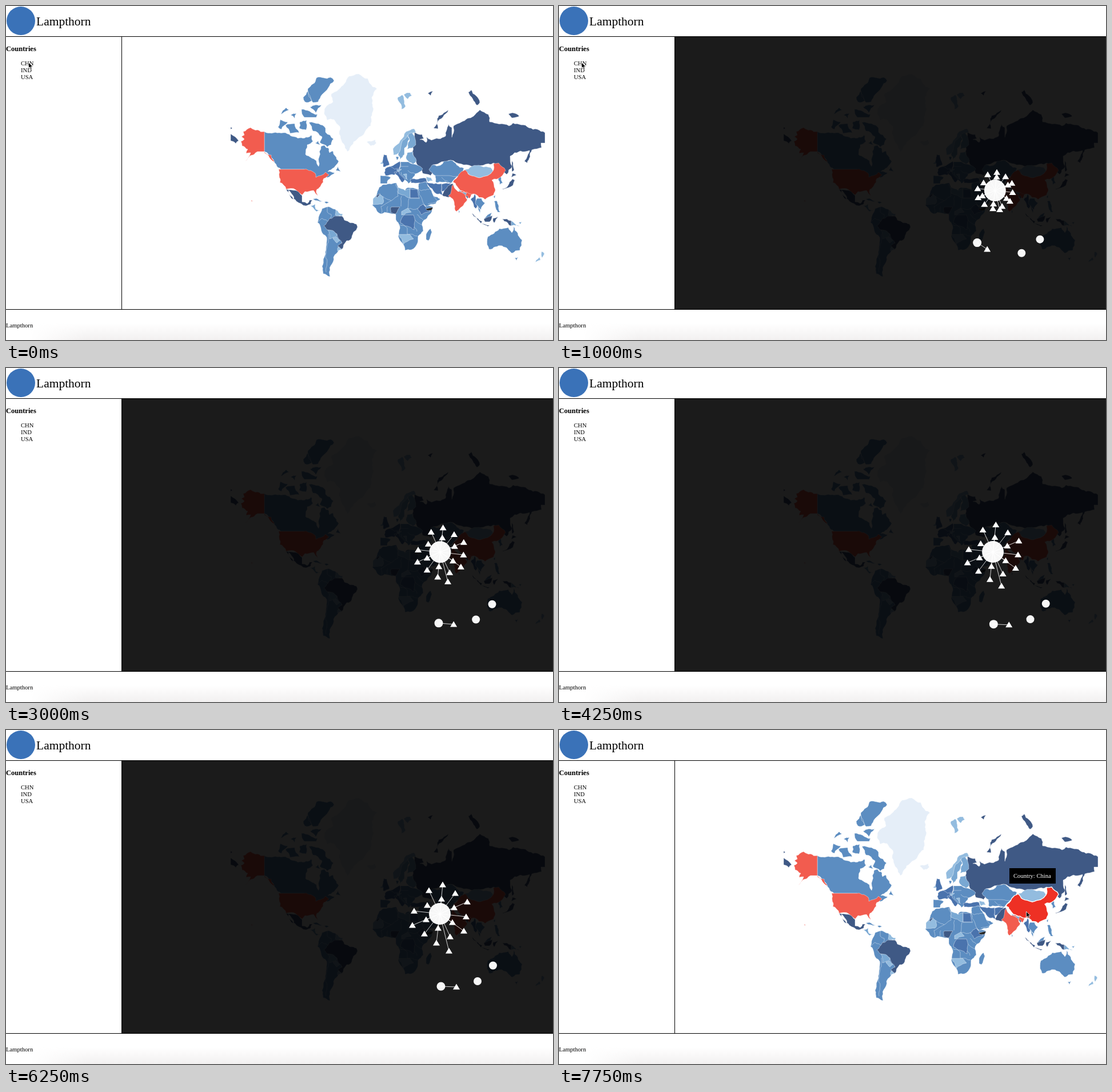
Recreate the animation shown at these times as an HTML page. Size 957 px wide and 585 px high, loop 8000 ms.

```html
<!DOCTYPE html>
<html lang="en">
<head>
<meta charset="utf-8">
<title>Lampthorn</title>
<style>
  html, body { margin: 0; width: 100%; height: 100%; overflow: hidden; background: #fff; }
  svg { display: block; width: 957px; height: 585px; }
  text { font: 10.64px "Liberation Serif", serif; }
  .title { font-size: 21.5px; }
  .heading { font-size: 12.5px; font-weight: bold; }
  #map path { stroke: #fff; stroke-width: .4; stroke-linejoin: round; }
  .blue { fill: #5c8dc1; }
  .deep { fill: #4a73ad; }
  .navy { fill: #3f5985; }
  .mid { fill: #79a8d3; }
  .pale { fill: #93bcdf; }
  .ice { fill: #e5eef8; }
  .red { fill: #f25c4f; }
  .border { fill: none; }
  #map .hover { fill: #ee3024; stroke-width: 1.3; }
</style>
</head>
<body>
<svg viewBox="0 0 957 585">
  <defs>
    <linearGradient id="down" x2="0" y2="1"><stop stop-color="#fff"/><stop offset="1" stop-color="#f2f0f0"/></linearGradient>
    <linearGradient id="across"><stop offset=".3" stop-color="#fff"/><stop offset="1" stop-color="#fff" stop-opacity="0"/></linearGradient>
  </defs>
  <rect y="556" width="957" height="29" fill="url(#down)"/>
  <rect y="556" width="140" height="29" fill="url(#across)"/>

  <circle cx="26" cy="26" r="25" fill="#3a72b8"/>
  <text class="title" x="53" y="34">Lampthorn</text>
  <text class="heading" y="78.5">Countries</text>
  <text x="26" y="104">CHN</text>
  <text x="26" y="116">IND</text>
  <text x="26" y="128">USA</text>
  <text y="563">Lampthorn</text>

  <g id="map">
    <!-- North America -->
    <path class="ice" d="M597 255L585 228 584 211 574 199 562 200 557 181 572 168 569 154 592 136 600 123 617 119 633 127 636 135 649 145 640 160 643 180 638 210 622 228 608 238Z"/>
    <path class="ice" d="M631 238L646 234 648 240 638 245Z"/>
    <path class="blue" d="M452 220L478 222 505 229 528 230 534 226 537 237 527 243 524 260 543 271 547 281 548 264 551 246 557 244 565 250 566 257 572 254 582 272 574 283 563 290 575 292 566 299 540 300 522 286 481 286 466 267 452 255Z"/>
    <path class="blue" d="M530 159L528 145 543 126 568 125 574 131 553 155 546 168 537 169ZM520 160L528 149 535 166 523 168ZM532 177L552 173 542 187ZM489 209L505 206 513 222 497 223ZM476 212L480 199 493 203 482 216ZM481 190L490 178 495 182ZM498 191L508 188 505 197ZM517 181L545 190 543 195 522 195Z"/>
    <path class="blue" d="M530 204L547 206 559 214 559 221 573 233 569 243 562 247 549 239 553 229 537 219ZM514 203L526 200 525 217 513 214ZM541 240L546 236 550 243ZM577 288L581 281 586 290Z"/>
    <path class="red" d="M452 220L428 213 415 220 417 226 412 229 417 233 411 237 413 245 423 251 420 258 428 257 417 272 434 260 440 255 452 255 464 261 470 273 452 257Z"/>
    <path class="red" d="M477 286L522 286 533 288 541 293 542 300 559 291 565 296 556 302 551 314 544 321 545 333 538 323 523 325 518 331 507 322 490 321 479 309Z"/>
    <path class="red" d="M429 340L431 341 430 343Z"/>
    <path class="navy" d="M490 321L507 323 518 332 518 343 527 346 531 340 536 340 533 347 525 350 508 342 494 323 503 339 497 333Z"/>
    <path class="mid" d="M529 349L541 347 542 356 551 358 543 360Z"/>
    <path class="blue" d="M537 338L543 337 554 342ZM557 343L565 344 560 346Z"/>

    <!-- South America -->
    <path class="blue" d="M551 361L553 355 561 352 576 356 590 375 585 425 573 440 566 470 567 474 555 469 553 456 561 405 545 379Z"/>
    <path class="border" d="M562 352L562 361 569 365 566 378 553 372 545 378M564 399L564 414 559 437 560 466"/>
    <path class="navy" d="M566 372L575 368 588 368 592 375 613 382 615 387 608 396 603 409 596 411 587 427 580 421 588 415 579 399 556 385Z"/>
    <path class="pale" d="M577 357L589 364 588 368 576 366ZM572 406L578 404 584 411 579 415ZM582 421L588 426 580 429Z"/>
    <path class="mid" d="M563 392L571 393 579 402 566 408Z"/>

    <!-- Africa -->
    <path class="blue" d="M659 313L683 310 686 318 698 323 703 318 721 321 733 351 747 352 744 362 728 380 730 394 721 403 720 415 709 427 698 428 687 400 689 386 682 374 682 365 656 364 641 349 643 337Z"/>
    <path class="border" d="M653 329L674 341 686 333 682 311M674 341L656 351 657 363M692 333L691 351M705 337L703 355 721 354M706 337L724 337M666 362L668 351M688 383L702 389 702 400 720 403M714 373L729 384M714 386L719 395M719 365L730 375"/>
    <path class="blue" d="M735 409L735 400 743 390 745 396 739 411Z"/>
    <path class="mid" d="M685 317L698 323 707 320 707 336 686 328Z"/>
    <path class="deep" d="M707 320L720 321 723 336 707 336ZM720 355L729 347 742 360 727 366ZM690 380L697 366 713 366 714 392Z"/>
    <path class="pale" d="M642 338L653 330 660 335 658 347 642 348ZM692 360L703 354 709 361 692 366ZM687 400L706 400 713 408 695 418Z"/>
    <path class="navy" d="M674 352L689 352 683 363 673 362ZM648 333L655 329 649 336Z"/>
    <path fill="#222" d="M734 355L747 353 744 358 737 358Z"/>

    <!-- Russia -->
    <path class="navy" d="M714 220L728 225 731 232 724 234 735 239 736 229 744 235 769 228 774 207 780 213 780 230 783 210 797 203 818 193 829 182 844 190 846 203 880 210 887 205 943 222 943 240 936 240 937 248 920 252 912 275 907 272 916 253 900 254 882 263 886 281 876 295 854 275 815 281 778 270 747 278 743 297 729 293 712 260Z"/>
    <path class="navy" d="M885 271L889 287 885 290ZM748 214L757 192 774 182 754 206 756 215ZM809 151L814 147 829 169 824 174ZM738 153L747 149 743 157ZM879 189L886 187 898 193 885 196ZM393 224L407 236 402 241 393 236ZM393 212L396 214 393 216Z"/>

    <!-- Europe -->
    <path class="pale" d="M685 161L694 156 699 176 692 181ZM696 155L707 152 710 157 703 163ZM678 261L677 250 700 220 714 215 717 221 702 228 688 257ZM654 276L660 269 659 277Z"/>
    <path class="mid" d="M686 261L694 235 703 226 706 233 697 249 697 260 690 269ZM703 226L711 222 717 243 702 251 706 236ZM702 257L712 255 718 271 712 277 701 269Z"/>
    <path class="blue" d="M655 297L673 300 667 311 655 311ZM682 264L687 264 684 270ZM690 273L704 273 718 278 729 285 716 294 712 300 704 311 687 291Z"/>
    <path class="deep" d="M661 260L666 261 671 278 660 282ZM663 286L672 281 689 272 688 287 679 296 664 297ZM679 291L687 289 698 304 694 309ZM707 304L735 302 737 309 709 310Z"/>
    <path class="pale" d="M683 287L692 286 687 290ZM695 295L701 294 701 303ZM735 299L744 301 747 306 738 308Z"/>
    <path class="border" d="M672 281L680 286 691 281 690 273M691 281L704 281M703 288L716 294M691 291L703 304"/>

    <!-- Asia -->
    <path class="blue" d="M722 311L737 309 748 333 760 338 752 346 735 351 721 322Z"/>
    <path class="border" d="M721 322L742 320M748 334L755 342 738 347"/>
    <path class="blue" d="M740 286L747 278 760 279 766 272 778 270 801 284 797 293 779 310 752 309 751 297Z"/>
    <path class="border" d="M751 297L775 297 790 298M762 300L775 309"/>
    <path class="deep" d="M736 308L762 311 764 331 753 329 742 318ZM762 312L779 310 771 320 762 325ZM813 339L820 329 825 350 822 355Z"/>
    <path class="navy" d="M763 331L771 319 781 311 784 317 775 335ZM868 320L878 315 886 303 890 305 887 314 870 321ZM884 300L886 293 893 296Z"/>
    <path class="blue" d="M821 346L824 337 832 337 838 345 831 357 824 350 830 364ZM861 303L866 299 869 310 864 313ZM853 334L856 331 855 337ZM854 342L858 341 865 361 860 361ZM791 357L794 360 792 363ZM837 372L850 362 848 371Z"/>
    <path class="navy" d="M815 363L833 377 831 381ZM831 381L846 384 843 386ZM836 373L851 367 846 378 838 378ZM852 372L861 369 857 374 854 380ZM868 373L884 376 884 385Z"/>
    <path class="mid" d="M884 376L899 386 884 385ZM897 379L902 378 900 382Z"/>
    <path class="pale" d="M802 287L815 281 848 283 852 289 843 297 828 301 811 296Z"/>
    <path class="red" d="M779 324L782 313 791 325 819 326 811 337 804 332 807 339 792 357 788 360 779 336 774 333Z"/>
    <path class="mid" d="M791 322L806 328 804 331Z"/>
    <path class="navy" d="M803 331L808 333 808 338Z"/>
    <path id="china" class="red" d="M782 308L792 295 803 287 811 296 828 301 843 297 852 289 853 276 862 275 874 288 866 299 850 305 856 321 853 331 838 339 818 329 795 323Z"/>

    <!-- Oceania -->
    <path class="blue" d="M844 422L843 404 863 390 879 388 885 397 888 386 903 410 899 428 885 433 868 420 845 426ZM890 441L896 440 893 446Z"/>
    <path class="pale" d="M937 430L942 434 938 441ZM933 440L935 445 924 452Z"/>
  </g>

  <path d="M0 53.5H957M0 531.5H957M202.5 54V531" stroke="#000"/>

  <g id="overlay">
    <rect x="202" y="54" width="755" height="477" opacity=".895"/>
    <path id="links" stroke="#fff" stroke-width=".8"/>
    <path id="leaves" fill="#fff"/>
    <g id="discs" fill="#fff" opacity=".97">
      <circle r="19"/><circle r="7.5"/><circle r="7"/><circle r="7"/>
    </g>
  </g>

  <g id="tooltip">
    <rect x="788" y="242" width="81" height="27"/>
    <text x="795" y="259" fill="#fff">Country: China</text>
  </g>
  <path id="cursor" d="M0 0V10L2.4 7.8 4 11.4 5.8 10.6 4.2 7.2H7.4Z" stroke="#fff" stroke-width=".8"/>
</svg>

<script>
const LOOP = 8000, STEP = 250, OPEN = 250, SPREAD = 1750, SETTLED = 6250, CLOSE = 6500;
const $ = id => document.getElementById(id);
const mix = (a, b, k) => a + (b - a) * k;

// Coastlines: split slanted edges with a seeded nudge, equal from both sides of a border.
function roughen([x1, y1], [x2, y2]) {
  const dx = x2 - x1, dy = y2 - y1, length = Math.hypot(dx, dy);
  if (length < 5 || !dx || !dy) return [[x2, y2]];
  const noise = Math.sin((x1 + x2) * 12.99 + (y1 + y2) * 78.23) * 43758.55;
  const nudge = (noise - Math.floor(noise) - .5) * Math.min(.3, 4 / length) * Math.sign(dx);
  const middle = [(x1 + x2) / 2 - dy * nudge, (y1 + y2) / 2 + dx * nudge];
  return [...roughen([x1, y1], middle), ...roughen(middle, [x2, y2])];
}

function roughPath(d) {
  return d.replace(/M([^MZ]+)(Z?)/g, (_, list, close) => {
    const points = list.match(/\d+ \d+/g).map(pair => pair.split(' ').map(Number));
    const ends = close ? [...points.slice(1), points[0]] : points.slice(1);
    return `M${points[0]}L${ends.flatMap((end, i) => roughen(points[i], end)).join(' ')}${close}`;
  });
}

for (const path of document.querySelectorAll('#map path')) {
  path.setAttribute('d', roughPath(path.getAttribute('d')));
}

// Free nodes: x, y when opened, after the burst, and at rest.
const hub = [766, 320, 762, 324, 759, 322];
const partner = [713, 340, 737, 436, 761, 449];
const partnerLeaf = [715, 363, 759, 444, 788, 450];
const loners = [[836, 369, 843, 420, 852, 412.5], [814, 397, 808, 443, 825, 440]];

// Resting offsets of the leaves around the hub; the earlier radii follow from the last.
const offsets = [
  [5, -51], [-19, -41], [27, -36], [3, -26], [-22, -15], [48, -21], [25, -11], [-45, -5], [46, 5],
  [-24, 10], [22, 15], [-48, 20], [42, 30], [-27, 35], [-3, 25], [18, 40], [-6, 51], [16, 65]
];
const spokes = offsets.map(([x, y]) => {
  const r = Math.hypot(x, y);
  return [16 + .14 * r, 40 * (1 - Math.exp(-r / 26)), r].flatMap((radius, i) =>
    [hub[2 * i] + x * radius / r, hub[2 * i + 1] + y * radius / r]);
});

const decay = (t, span, tau) => (1 - Math.exp(-t / tau)) / (1 - Math.exp(-span / tau));

function place(node, t, tau = 700) {
  const bursting = t < SPREAD, i = bursting ? 0 : 2;
  const k = bursting ? decay(t - OPEN, SPREAD - OPEN, 600) : decay(t - SPREAD, SETTLED - SPREAD, tau);
  return [mix(node[i], node[i + 2], k), mix(node[i + 1], node[i + 3], k)];
}

function drawGraph(t) {
  const centers = [hub, partner, ...loners].map(node => place(node, t));
  const tips = spokes.map(node => place(node, t, 1900));
  const partnerTip = place(partnerLeaf, t);
  const link = (a, b) => `M${a}L${b}`;
  $('links').setAttribute('d', tips.map(p => link(centers[0], p)).join('') + link(centers[1], partnerTip));
  $('leaves').setAttribute('d', [...tips, partnerTip].map(([x, y]) => `M${x} ${y - 5.5}l6 10h-12z`).join(''));
  centers.forEach((p, i) => $('discs').children[i].setAttribute('transform', `translate(${p})`));
}

// Pointer stops: time, x, y
const pointerIn = [[0, 39.5, 99], [1500, 460, 160], [1750, 794.5, 212]];
const pointerBack = [[7000, 930, 540], [7250, 872, 375], [7500, 823, 325], [7750, 817.5, 318]];

function pointerAt(t) {
  if (t >= 2000 && t < 7000) return null;
  return (t < 2000 ? pointerIn : pointerBack).findLast(stop => stop[0] <= t);
}

const show = (id, on) => $(id).setAttribute('visibility', on ? 'visible' : 'hidden');

function frame() {
  const t = Math.floor(performance.now() % LOOP / STEP) * STEP;
  const graph = t >= OPEN && t < CLOSE, hover = t >= 7500, pointer = pointerAt(t);
  show('overlay', graph);
  if (graph) drawGraph(t);
  show('tooltip', hover);
  $('china').setAttribute('class', hover ? 'hover' : 'red');
  show('cursor', pointer);
  if (pointer) $('cursor').setAttribute('transform', `translate(${pointer[1]} ${pointer[2]})`);
  requestAnimationFrame(frame);
}
frame();
</script>
</body>
</html>
```
